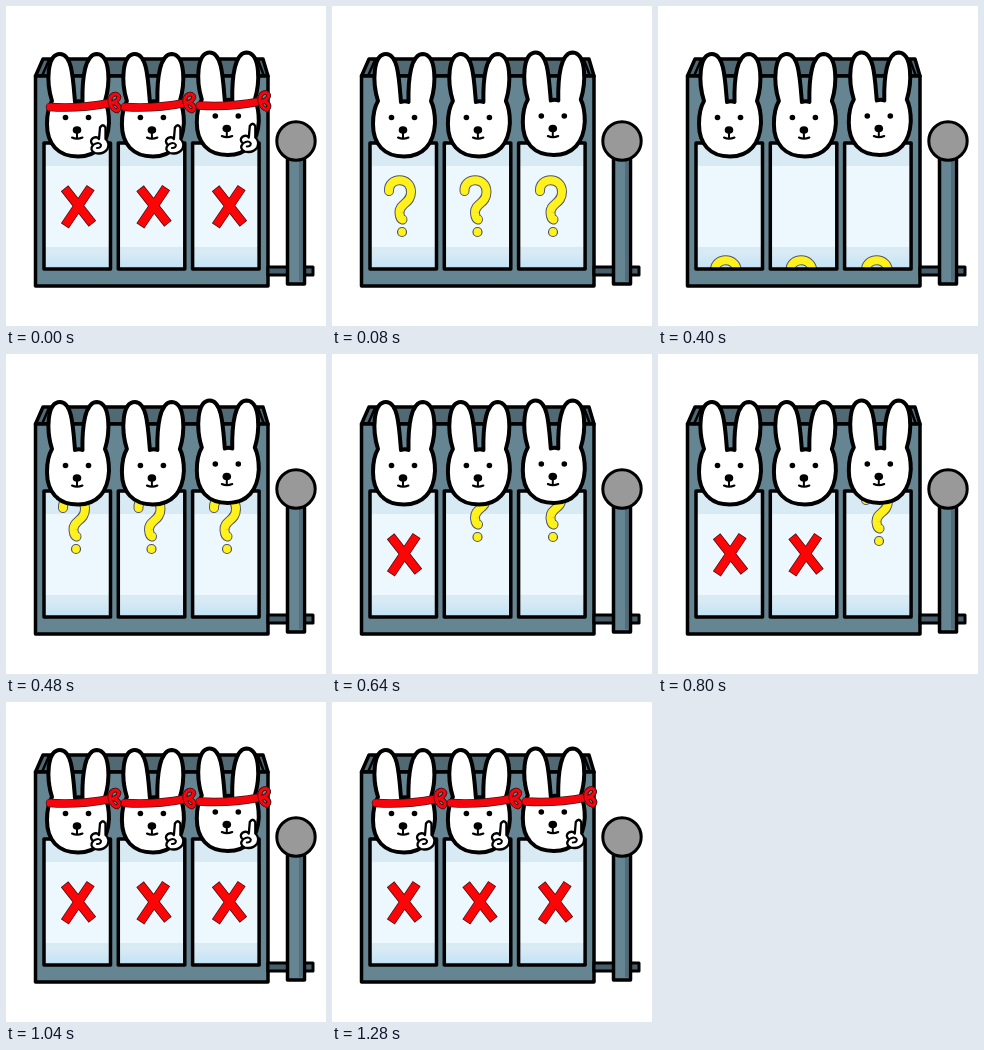
An HTML page that plays this animation: 320 px wide and 320 px high, repeating every 1.36 s.

```html
<!DOCTYPE html>
<html lang="en">
<head>
<meta charset="utf-8">
<title>Rabbit slot machine</title>
<style>
html, body { margin: 0; width: 100%; height: 100%; overflow: hidden; background: #fff; }
svg { display: block; width: 100vw; height: 100vh; }
</style>
</head>
<body>
<svg viewBox="0 0 320 320" stroke-linecap="round" stroke-linejoin="round">
  <defs>
    <clipPath id="glass"><path d="M38 137h66.500v126h-66.500z"/></clipPath>
    <linearGradient id="glow" x2="0" y2="1">
      <stop offset=".3" stop-color="#d8eaf4"/>
      <stop offset="1" stop-color="#bfe2f6"/>
    </linearGradient>
    <path id="frame" d="M38 137h66.500v126h-66.500z"/>
    <path id="bars" d="M61.500 186L83.500 214M82 185.500L61.500 216"/>
    <path id="hook" d="M57 185C56 171 79 170 79 186C79 198 67 197 67.500 207Q68 213 70.500 213.500"/>
    <path id="band" d="M44 101Q73 103 104 97"/>

    <g id="cross" fill="none" stroke-linecap="square">
      <use href="#bars" stroke="#4a1014" stroke-width="9.500"/>
      <use href="#bars" stroke="#fb0507" stroke-width="8"/>
    </g>

    <g id="question" fill="none">
      <use href="#hook" stroke="#55556a" stroke-width="10"/>
      <use href="#hook" stroke="#fff21c" stroke-width="8"/>
      <circle cx="70" cy="226" r="4.500" fill="#fff21c" stroke="#55556a" stroke-width="1.200"/>
    </g>

    <g id="head" stroke="#000">
      <path d="M46 95C40 76 41 48 54 48C66 48 67 72 69 96Q73 94.500 76.500 96C76 72 79 48 91 48C105 49 104 79 99 95C102 101 103 109 103 117C102 138 91 150.500 72 150.500C52 150.500 41 138 41 118C41 107 43 100 46 95Z" fill="#fff" stroke-width="4"/>
      <g stroke="none">
        <circle cx="59.500" cy="111.500" r="2.800"/>
        <circle cx="82.500" cy="111.500" r="2.800"/>
        <ellipse cx="71" cy="124" rx="4.300" ry="3.800"/>
      </g>
      <path d="M71 125v7M66 131.500Q71 134 76.500 131.500" fill="none" stroke-width="2"/>
    </g>

    <g id="cheer" stroke="#000">
      <g fill="none">
        <use href="#band" stroke="#4a1014" stroke-width="8.500"/>
        <use href="#band" stroke="#f5060c" stroke-width="7"/>
        <path id="bow" d="M104 97C103 87 112 86 113 91Q112 96 104 97C112 96 116 102 111 105Q106 104 104 97" stroke="#4a1014" stroke-width="4.500"/>
        <use href="#bow"/>
        <path d="M104 97C103 87 112 86 113 91Q112 96 104 97C112 96 116 102 111 105Q106 104 104 97" stroke="#f5060c" stroke-width="3"/>
      </g>
      <path d="M93 133L94 121.500Q97 117 99.500 121.500L99.500 133Q104 137 101.500 143Q97 149 89 147Q83 144 87 139Q83 135 87 132Q91 130 93 133Z" fill="#fff" stroke-width="2.300"/>
      <path d="M87 139Q93 135 95 139Q95 142 91 142" fill="none" stroke-width="2"/>
    </g>
  </defs>

  <g stroke="#000" stroke-width="3.500">
    <path d="M29.500 70L37 53H257L262 70Z" fill="#506973"/>
    <path d="M29.500 70H262V280H29.500Z" fill="#668592"/>
    <path d="M43 54L36 70M252 54L258 70" fill="none" stroke-width="2.500"/>
    <path d="M262 261h45v8h-45z" fill="#45606c" stroke-width="3"/>
    <path d="M281.500 150h17v128h-17z" fill="#668592"/>
    <path d="M294.500 156V274" stroke="#526d79" stroke-width="3"/>
    <circle cx="290" cy="135" r="19.200" fill="#999" stroke-width="3"/>
  </g>
  <g id="reels"></g>
</svg>
<script>
const LOOP = 1360, STEP = 80, WIN_STEP = 12;
// Vertical offset of the spinning symbols at each step.
const spin = [0, 0, 0, 0, 35, 80, -31, 40, -43, 38, -39, 40];
const stopSteps = [8, 10, 12];

const reels = document.getElementById('reels');
reels.innerHTML = [0, 1, 2].map(i => `
  <g transform="translate(${i * 74.3} 0)">
    <use href="#frame" fill="#ecf7fe"/>
    <path d="M38 137h66.500v23h-66.500z" fill="#d8eaf4"/>
    <path d="M38 241h66.500v22h-66.500z" fill="url(#glow)"/>
    <g clip-path="url(#glass)"><use class="symbol" x="${i * 1.2}"/></g>
    <use href="#frame" fill="none" stroke="#000" stroke-width="3.500"/>
    <g transform="translate(${i * 0.6} ${i === 2 ? -1.5 : 0})">
      <use href="#head"/><use class="cheer" href="#cheer"/>
    </g>
  </g>`).join('');

const symbols = reels.querySelectorAll('.symbol');
const cheers = reels.querySelectorAll('.cheer');

function draw(now) {
  const step = Math.floor(now % LOOP / STEP);
  const won = step === 0 || step >= WIN_STEP;
  symbols.forEach((symbol, i) => {
    const stopped = step === 0 || step >= stopSteps[i];
    symbol.setAttribute('href', stopped ? '#cross' : '#question');
    symbol.setAttribute('y', stopped ? 0 : spin[step]);
  });
  cheers.forEach(cheer => cheer.setAttribute('visibility', won ? 'visible' : 'hidden'));
  requestAnimationFrame(draw);
}
draw(performance.now());
</script>
</body>
</html>
```
